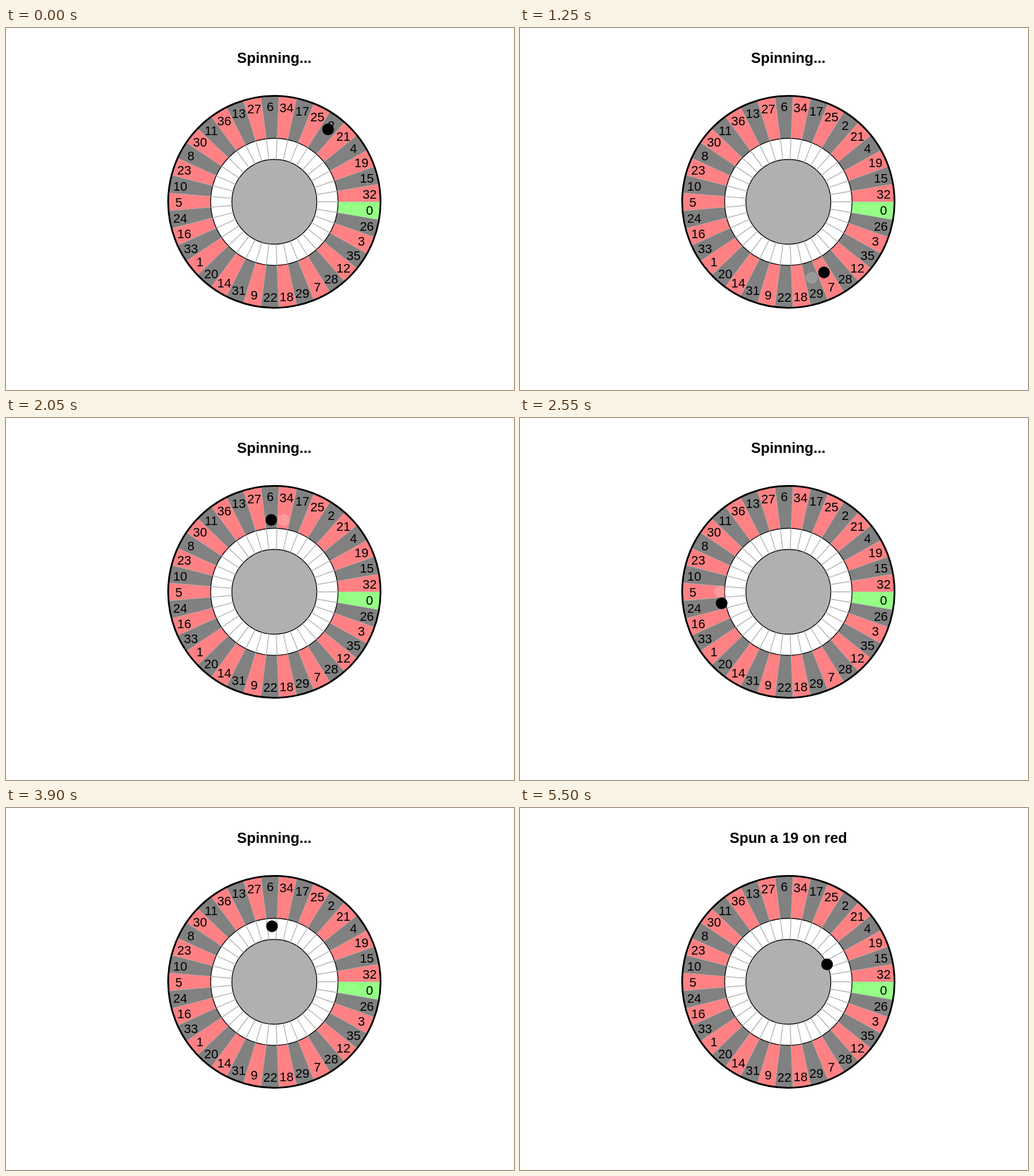
Write an HTML page that moves like this. It is 885 px wide and 632 px high and loops after 9.2 s.

```html
<!DOCTYPE html>
<html lang="en">
<head>
<meta charset="utf-8">
<title>Roulette</title>
<style>
  html, body { margin: 0; width: 100%; height: 100%; overflow: hidden; background: #fff; }
  svg { display: block; width: 885px; height: 632px; }
  text { font: 22px "Liberation Sans", Arial, sans-serif; text-anchor: middle; }
  #title { font-size: 25.4px; font-weight: bold; }
  .seam { stroke: #b0b0b0; stroke-width: 1.4; }
  .seam.thin { stroke-width: .8; opacity: .8; }
  .rim { fill: none; stroke: #000; stroke-width: 1.4; }
</style>
</head>
<body>
<svg viewBox="0 0 885 632">
  <text id="title" x="467.5" y="61.2"></text>
  <g id="wheel" transform="translate(467.5 303.5)"></g>
</svg>
<script>
const ORDER = [32, 15, 19, 4, 21, 2, 25, 17, 34, 6, 27, 13, 36, 11, 30, 8, 23, 10, 5,
  24, 16, 33, 1, 20, 14, 31, 9, 22, 18, 29, 7, 28, 12, 35, 3, 26, 0];
const RED = '#ff8183', BLACK = '#818181', GREEN = '#95ff86';
const OUTER = 185, INNER = 111, HUB = 74;
const LOOP = 9200, STEP = 50, STOP = 108, RESULT = 110;
const START_R = OUTER * 0.85, START_POCKET = 5.5;

const wheel = document.getElementById('wheel');
const title = document.getElementById('title');

function add(tag, attrs, text = '') {
  const el = document.createElementNS('http://www.w3.org/2000/svg', tag);
  for (const key in attrs) el.setAttribute(key, attrs[key]);
  el.textContent = text;
  return wheel.appendChild(el);
}

// Pockets are counted counter-clockwise from the right.
function polar(r, pocket) {
  const a = pocket / ORDER.length * 2 * Math.PI;
  return [r * Math.cos(a), -r * Math.sin(a)];
}

function seam(from, to, pocket, cls) {
  const [x1, y1] = polar(from, pocket), [x2, y2] = polar(to, pocket);
  add('line', { x1, y1, x2, y2, class: cls });
}

ORDER.forEach((num, i) => {
  const d = `M${polar(INNER, i)}L${polar(OUTER, i)}A${OUTER} ${OUTER} 0 0 0 ${polar(OUTER, i + 1)}` +
    `L${polar(INNER, i + 1)}A${INNER} ${INNER} 0 0 1 ${polar(INNER, i)}Z`;
  add('path', { d, fill: num === 0 ? GREEN : i % 2 ? BLACK : RED });
});
add('circle', { r: INNER, class: 'rim' });
add('circle', { r: HUB, class: 'rim', style: 'fill:#b0b0b0' });
ORDER.forEach((_, i) => {
  seam(HUB, INNER, i, 'seam');
  seam(INNER, OUTER, i, 'seam thin');
});
add('circle', { r: OUTER, class: 'rim', style: 'stroke-width:3' });
ORDER.forEach((num, i) => {
  const [x, y] = polar(OUTER * 0.9, i + 0.5);
  add('text', { x, y: y + 8.2 }, num);
});

const ghost = add('circle', { r: 9.7, fill: '#fff', 'fill-opacity': 0.2, stroke: '#fff', 'stroke-opacity': 0.2 });
const ball = add('circle', { r: 10.2 });

function place(el, n) {
  const k = Math.min(n, STOP);
  const [x, y] = polar(START_R + (HUB - START_R) * k / STOP, START_POCKET + k);
  el.setAttribute('cx', x);
  el.setAttribute('cy', y);
}

function draw(now) {
  const n = Math.floor(now % LOOP / STEP);
  place(ball, n);
  place(ghost, Math.max(n - 1, 0));
  ghost.setAttribute('visibility', n > 0 && n <= STOP ? 'visible' : 'hidden');
  const text = n < RESULT ? 'Spinning...' : 'Spun a 19 on red';
  if (title.textContent !== text) title.textContent = text;
}

const begin = performance.now();
function tick() {
  draw(performance.now() - begin);
  requestAnimationFrame(tick);
}
tick();
</script>
</body>
</html>
```
